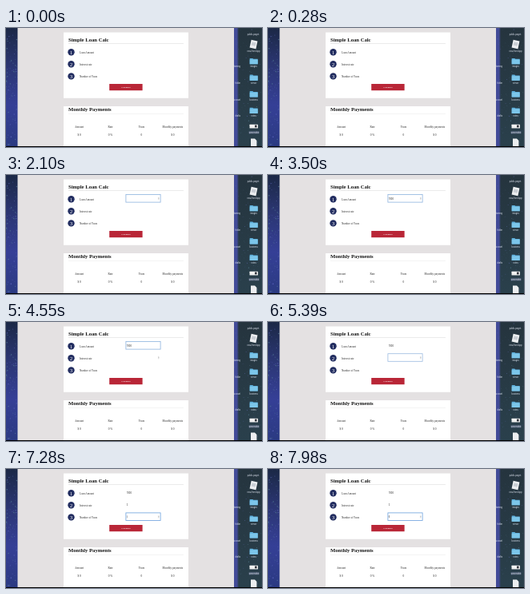
Animation of 320 by 149 pixels, one loop 8000 ms. Source, as an HTML page:

```html
<!DOCTYPE html>
<html lang="en">
<head>
<meta charset="utf-8">
<title>Simple Loan Calc</title>
<style>
html, body { margin: 0; width: 100%; height: 100%; overflow: hidden; background: #000; }
svg { display: block; width: 320px; height: 149px; }
text { font-family: "Liberation Serif", "Times New Roman", serif; fill: #2a2a2a; }
.title { font-size: 6.65px; font-weight: bold; fill: #161616; }
.label { font-size: 3.25px; }
.cell { font-size: 3.4px; text-anchor: middle; }
.num { font-size: 7px; fill: #fff; text-anchor: middle; }
.button { font-size: 2.8px; font-weight: bold; fill: #f8e4e6; text-anchor: middle; }
.value { font: 2.75px "Liberation Sans", Arial, sans-serif; }
.icon { font: 2.6px "Liberation Sans", Arial, sans-serif; fill: #dfe5f0; text-anchor: middle; }
.cut { text-anchor: end; }
.ring { fill: #fff; stroke: #8db3de; stroke-width: .8; }
.caret { fill: #555; }
.spin { fill: #999; }

/* One loop is 8 s, so 1% is 80 ms. */
.anim { opacity: 0; animation: 8s step-end infinite; }
#ring1 { animation-name: ring1; }
#ring2 { animation-name: ring2; }
#ring3 { animation-name: ring3; }
#caret1 { animation-name: caret1; }
#caret2 { animation-name: caret2; }
#caret3 { animation-name: caret3; }
#spin1 { animation-name: spin1; }
#spin2 { animation-name: spin2; }
#spin3 { animation-name: spin3; }
#digit1 { animation-name: digit1; }
#digit2 { animation-name: digit2; }
#digit3 { animation-name: digit3; }
#digit4 { animation-name: digit4; }
#rate { animation-name: rate; }
#years { animation-name: years; }

@keyframes ring1 { 0% { opacity: 0 } 20.125% { opacity: 1 } 57.75%, 100% { opacity: 0 } }
@keyframes ring2 {
  0% { opacity: 0; stroke: #9cbbe0 }
  57.75% { opacity: 1; stroke: #9cbbe0 }
  77.875% { opacity: 1; stroke: #a3a6ab }
  91%, 100% { opacity: 0; stroke: #a3a6ab }
}
@keyframes ring3 { 0% { opacity: 0; stroke: #6ba0dc } 91%, 100% { opacity: 1; stroke: #6ba0dc } }
@keyframes caret1 { 0% { opacity: 0 } 20.125% { opacity: 1 } 26.25%, 100% { opacity: 0 } }
@keyframes caret2 {
  0% { opacity: 0 } 57.75% { opacity: 1 } 67.375% { opacity: 0 }
  73.5% { opacity: 1 } 77.875%, 100% { opacity: 0 }
}
@keyframes caret3 { 0% { opacity: 0 } 91% { opacity: 1 } 96.25%, 100% { opacity: 0 } }
@keyframes spin1 { 0% { opacity: 0 } 17.5% { opacity: 1 } 56%, 100% { opacity: 0 } }
@keyframes spin2 {
  0% { opacity: 0 } 14% { opacity: 1 } 17.5% { opacity: 0 }
  56% { opacity: 1 } 88.375%, 100% { opacity: 0 }
}
@keyframes spin3 { 0% { opacity: 0 } 88.375%, 100% { opacity: 1 } }
@keyframes digit1 { 0% { opacity: 0 } 28.875%, 100% { opacity: 1 } }
@keyframes digit2 { 0% { opacity: 0 } 35%, 100% { opacity: 1 } }
@keyframes digit3 { 0% { opacity: 0 } 39.375%, 100% { opacity: 1 } }
@keyframes digit4 { 0% { opacity: 0 } 42%, 100% { opacity: 1 } }
@keyframes rate { 0% { opacity: 0 } 77.875%, 100% { opacity: 1 } }
@keyframes years { 0% { opacity: 0 } 98.875%, 100% { opacity: 1 } }
</style>
</head>
<body>
<svg viewBox="0 0 320 149">
  <defs>
    <linearGradient id="nebula" x1="0" y1="0" x2="0" y2="1">
      <stop offset="0" stop-color="#1b2846"/>
      <stop offset=".3" stop-color="#2a3570"/>
      <stop offset=".65" stop-color="#353f96"/>
      <stop offset="1" stop-color="#2b3a82"/>
    </linearGradient>
    <linearGradient id="night" x1="0" y1="0" x2="0" y2="1">
      <stop offset="0" stop-color="#25343e"/>
      <stop offset="1" stop-color="#2a404c"/>
    </linearGradient>
    <linearGradient id="edge">
      <stop offset=".6" stop-color="#424b98"/>
      <stop offset="1" stop-color="#424b98" stop-opacity="0"/>
    </linearGradient>
    <g id="folder">
      <path d="M-5-3.6h3.6l1 .9H5v6.4H-5z" fill="#5fb0dc"/>
      <path d="M-5-1.9H5v5.6H-5z" fill="#7cc6ea"/>
    </g>
    <path id="arrows" d="M0-.3l.8-1.1.8 1.1zM0 .4l.8 1.1.8-1.1z"/>
  </defs>

  <rect width="15" height="148" fill="url(#nebula)"/>
  <rect x="285" width="35" height="148" fill="url(#night)"/>
  <rect x="285" width="6" height="148" fill="url(#edge)"/>
  <g id="stars"></g>

  <g id="desktop">
    <text class="icon" x="309" y="9.4">public-pages</text>
    <g transform="rotate(12 309.5 20.5)">
      <rect x="305.5" y="15.5" width="8" height="10" fill="#eceef0"/>
      <rect x="307" y="18" width="5" height="4" fill="#c9ced4"/>
    </g>
    <text class="icon" x="309.5" y="30">new-front.app</text>
    <rect x="304.5" y="120.7" width="10.5" height="4.8" rx=".6" fill="#f1f1f1"/>
    <rect x="311" y="121.6" width="2.6" height="2.8" fill="#30343c"/>
    <rect x="303.5" y="129" width="13" height="3.6" rx=".8" fill="#4a5a70"/>
    <text class="icon" x="310" y="131.6">screenshot</text>
    <path d="M306 138.5h5l2.4 2.4v7.1H306z" fill="#eceef0"/>
  </g>

  <rect x="14.5" width="270.5" height="148" fill="#e4e1e2"/>
  <rect x="72" y="5.5" width="156" height="82.3" fill="#fff"/>
  <rect x="72" y="98" width="156" height="50" fill="#fff"/>

  <text class="title" x="78" y="16.7">Simple Loan Calc</text>
  <path d="M78 19.5H222" stroke="#dedede" stroke-width=".6"/>
  <path d="M78 107.5H222" stroke="#ececec" stroke-width=".6"/>
  <g id="rows"></g>

  <rect x="129.2" y="70" width="41.4" height="8.2" fill="#b92637"/>
  <text class="button" x="150" y="75">Calculate</text>

  <text class="title" x="78" y="104.2">Monthly Payments</text>
  <g id="table"></g>

  <rect class="ring anim" id="ring1" x="149.9" y="24.5" width="43.2" height="9.6"/>
  <rect class="ring anim" id="ring2" x="149.9" y="39.7" width="43.2" height="9.6"/>
  <rect class="ring anim" id="ring3" x="149.9" y="54.9" width="43.2" height="9.6"/>
  <text class="value anim" id="digit1" x="150.8" y="30.7">7</text>
  <text class="value anim" id="digit2" x="152.33" y="30.7">0</text>
  <text class="value anim" id="digit3" x="153.86" y="30.7">0</text>
  <text class="value anim" id="digit4" x="155.39" y="30.7">0</text>
  <text class="value anim" id="rate" x="150.8" y="45.7">5</text>
  <text class="value anim" id="years" x="150.8" y="60.8">6</text>
  <rect class="caret anim" id="caret1" x="151" y="27.8" width=".4" height="3"/>
  <rect class="caret anim" id="caret2" x="151" y="43.1" width=".4" height="3"/>
  <rect class="caret anim" id="caret3" x="151" y="58.3" width=".4" height="3"/>
  <use class="spin anim" id="spin1" href="#arrows" x="190" y="29.4"/>
  <use class="spin anim" id="spin2" href="#arrows" x="190" y="44.6"/>
  <use class="spin anim" id="spin3" href="#arrows" x="190" y="59.8"/>

  <rect y="148" width="320" height="1" fill="#000"/>
</svg>
<script>
const add = (parent, tag, attrs, content = '') => {
  const el = document.createElementNS('http://www.w3.org/2000/svg', tag);
  for (const key in attrs) el.setAttribute(key, attrs[key]);
  el.textContent = content;
  document.getElementById(parent).append(el);
};

['Loan Amount', 'Interest rate', 'Number of Years'].forEach((label, i) => {
  const y = 30.2 + i * 15.1;
  add('rows', 'circle', { cx: 81.5, cy: y, r: 4.2, fill: '#222d60' });
  add('rows', 'text', { class: 'num', x: 81.5, y: y + 2.3 }, i + 1);
  add('rows', 'text', { class: 'label', x: 92, y: y + 1.6 }, label);
});

[['Amount', '$ 0'], ['Rate', '0 %'], ['Years', '0'], ['Monthly payments', '$ 0']].forEach(([head, value], i) => {
  const x = 91.6 + i * 38.9;
  add('table', 'text', { class: 'cell', x, y: 125 }, head);
  add('table', 'text', { class: 'cell', x, y: 135.4 }, value);
});

// Desktop folders, with the ends of labels that the page covers.
['images', 'server', 'business', 'notes'].forEach((name, i) => {
  const y = 41.5 + i * 20.6;
  add('desktop', 'use', { href: '#folder', x: 309.7, y });
  add('desktop', 'text', { class: 'icon', x: 309.7, y: y + 7.9 }, name);
  add('desktop', 'text', { class: 'icon cut', x: 293, y: y + 7.9 }, ['planning', 'folder', 'account', 'drafts'][i]);
});

let seed = 11;
const rnd = () => (seed = seed * 16807 % 2147483647) / 2147483647;
for (let i = 0; i < 220; i++) {
  const left = i % 2;
  add('stars', 'circle', {
    cx: left ? rnd() * 14.5 : 285 + rnd() * 35,
    cy: rnd() * 147,
    r: .2 + rnd() * (left ? .6 : .35),
    fill: rnd() < .5 ? '#6f74d0' : '#5f8fa0',
    opacity: .2 + rnd() * .5
  });
}
</script>
</body>
</html>
```
